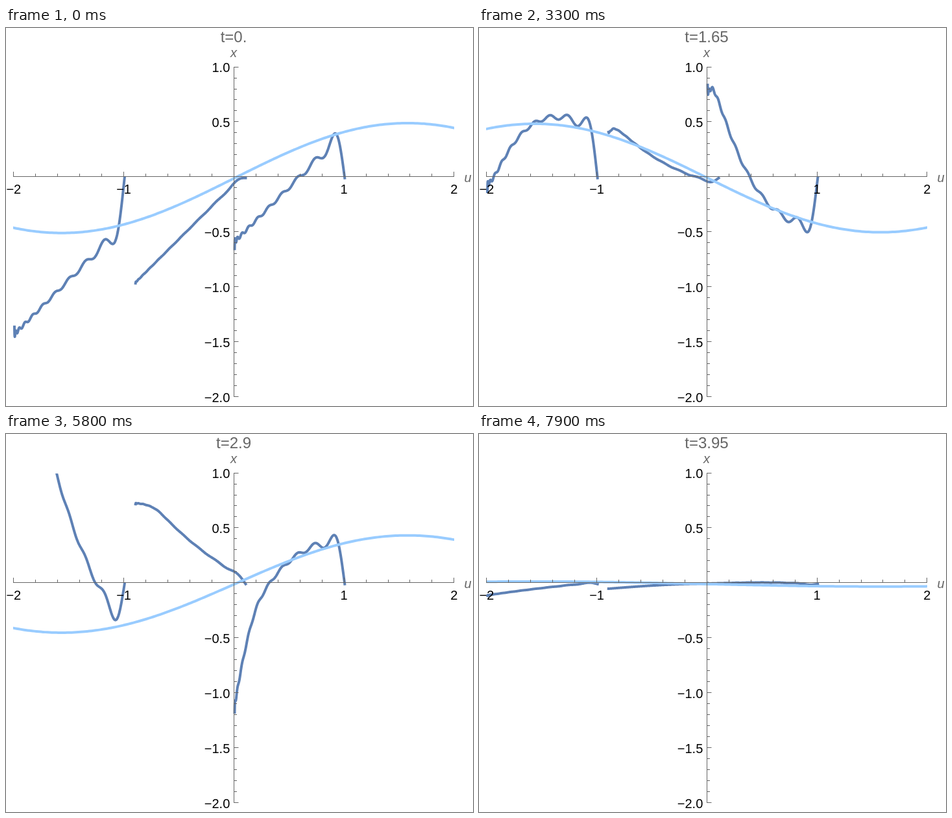
Recreate the animation shown at these times as an HTML page with a canvas. Size 720x584 px, loop 8 s.

```html
<!DOCTYPE html>
<html lang="en">
<head>
<meta charset="utf-8">
<title>Swinging chains</title>
<style>
  html, body { margin: 0; height: 100%; overflow: hidden; background: #fff; }
  canvas { display: block; }
</style>
</head>
<body>
<canvas id="stage" width="720" height="584"></canvas>
<script>
const ctx = document.getElementById('stage').getContext('2d');
const UNIT = 169.75, MODES = 20, POINTS = 320, DRIVE = 2;
const LOOP = 8000, STEP = 100;

// Bessel function of integer order, by its integral form
function bessel(order, x) {
  const n = 64;
  let sum = 0;
  for (let i = 0; i < n; i++) {
    const a = (i + 0.5) * Math.PI / n;
    sum += Math.cos(order * a - x * Math.sin(a));
  }
  return sum / n;
}

// Eigenmodes of a hanging chain of length 1 with unit gravity
const modes = Array.from({ length: MODES }, (_, n) => {
  let zero = (n + 0.75) * Math.PI;
  for (let i = 0; i < 5; i++) zero += bessel(0, zero) / bessel(1, zero);
  const slope = bessel(1, zero);
  return {
    omega: zero / 2,
    flat: 2 / (zero * slope),
    ramp: 8 / (zero ** 3 * slope),
    shape: Array.from({ length: POINTS + 1 }, (_, i) => bessel(0, zero * i / POINTS))
  };
});

const pivotSwing = u => 0.5 * Math.sin(u);

// Chain released from a slope of 1 while its pivot swings harmonically
function chainPoints(start, t) {
  const swing = pivotSwing(start + 1);
  const weights = modes.map(({ omega, flat, ramp }) => {
    const forced = flat * swing * omega ** 2 / (omega ** 2 - DRIVE ** 2);
    const free = flat * swing - ramp - forced;
    return forced * Math.cos(DRIVE * t) + free * Math.cos(omega * t);
  });
  return Array.from({ length: POINTS + 1 }, (_, i) => [
    start + (i / POINTS) ** 2,
    modes.reduce((sum, mode, n) => sum + weights[n] * mode.shape[i], 0)
  ]);
}

function drawCurve(points, color) {
  ctx.strokeStyle = color;
  ctx.beginPath();
  for (const [u, x] of points) ctx.lineTo(352.5 + UNIT * u, 231.8 - UNIT * x);
  ctx.stroke();
}

function drawCurves(t) {
  ctx.save();
  ctx.beginPath();
  ctx.rect(11, 61, 680, 509);
  ctx.clip();
  ctx.lineWidth = 4;
  ctx.lineCap = 'square';
  ctx.lineJoin = 'round';
  for (const start of [-2, -0.9, 0]) drawCurve(chainPoints(start, t), '#5e81b5');
  const wave = Array.from({ length: 205 }, (_, i) => {
    const u = -2.04 + i * 0.02;
    return [u, pivotSwing(u) * Math.cos(DRIVE * t)];
  });
  drawCurve(wave, '#99ccff');
  ctx.restore();
}

function text(str, x, y, align, font, color) {
  ctx.font = font + ' "Liberation Sans", Arial, sans-serif';
  ctx.textAlign = align;
  ctx.fillStyle = color;
  ctx.fillText(str, x, y);
}

const crisp = v => Math.floor(v) + 0.5;
const axisX = u => crisp(351.38 + UNIT * u);
const axisY = x => crisp(229.81 - UNIT * x);
const signed = str => str.replace('-', '\u2212');

function line(x1, y1, x2, y2) {
  ctx.moveTo(x1, y1);
  ctx.lineTo(x2, y2);
}

function drawAxes() {
  const x0 = axisX(0), y0 = axisY(0);
  ctx.strokeStyle = '#666';
  ctx.lineWidth = 1;
  ctx.beginPath();
  line(11, y0, 691, y0);
  line(x0, 60, x0, 570);
  for (let i = -10; i <= 10; i++) {
    const x = axisX(i / 5);
    if (i) line(x, y0, x, y0 - (i % 5 ? 4.5 : 7.5));
  }
  for (let i = -20; i <= 10; i++) {
    const y = axisY(i / 10);
    if (i) line(x0, y, x0 + (i % 5 ? 4.5 : 7), y);
  }
  ctx.stroke();

  for (const u of [-2, -1, 1, 2]) {
    text(signed(String(u)), 351.3 + UNIT * u, 256, 'center', '20px', '#000');
  }
  for (let x = -2; x <= 1; x += 0.5) {
    if (x) text(signed(x.toFixed(1)), 345.3, 238 - UNIT * x, 'right', '20px', '#000');
  }
  text('x', 351, 45, 'center', 'italic 20px', '#666');
  text('u', 712, 238, 'center', 'italic 20px', '#666');
}

function frame(now) {
  const t = Math.floor(now % LOOP / STEP) * 0.05;
  const label = String(+t.toFixed(2));
  ctx.fillStyle = '#fff';
  ctx.fillRect(0, 0, 720, 584);
  drawCurves(t);
  drawAxes();
  text('t=' + label + (label.includes('.') ? '' : '.'), 351, 22, 'center', '24px', '#666');
  requestAnimationFrame(() => frame(performance.now() - begin));
}

const begin = performance.now();
frame(0);
</script>
</body>
</html>
```
